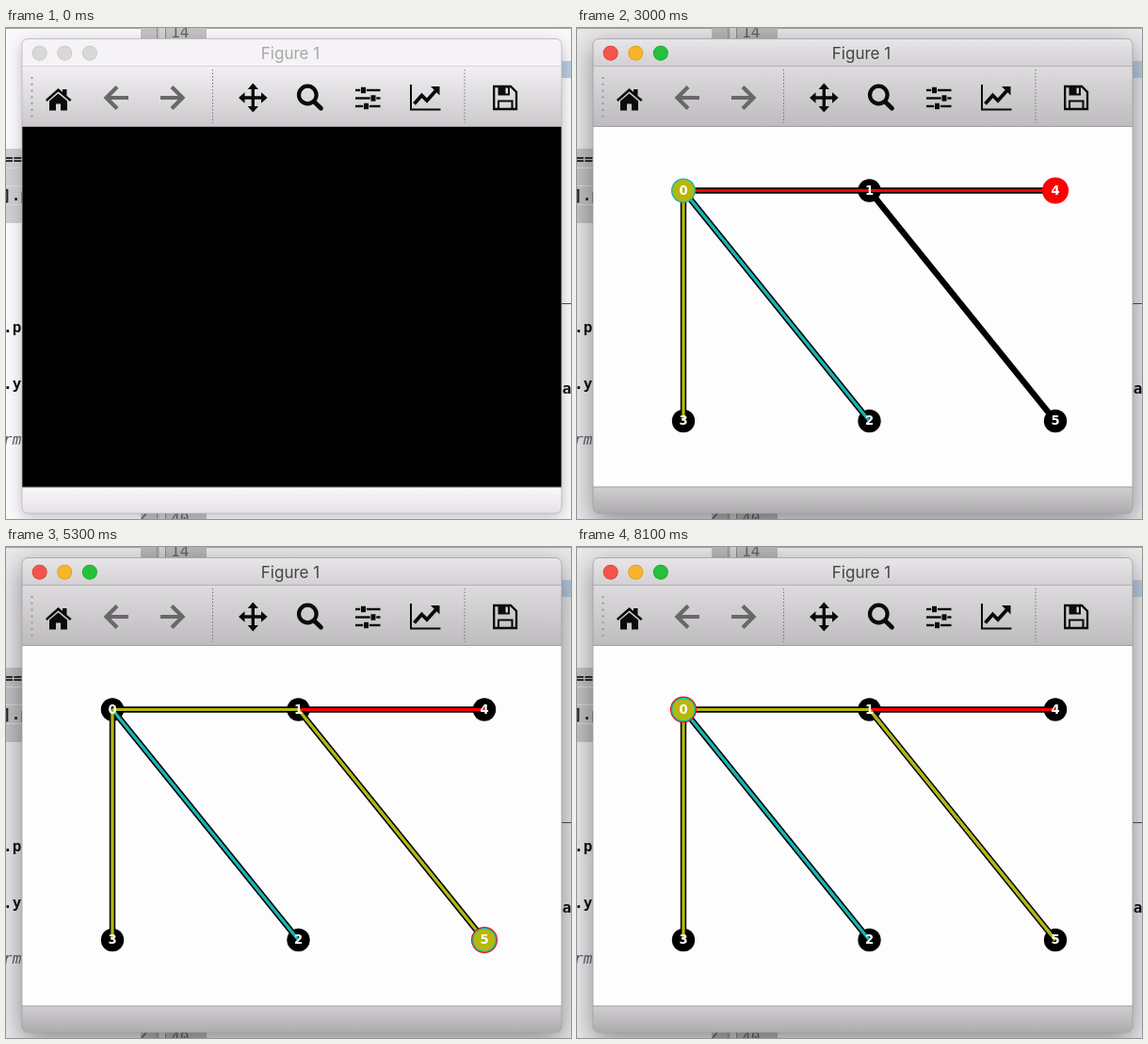
Recreate the animation shown at these times as an HTML page with a canvas. Size 600 by 521 pixels, loop 8.5 s.

```html
<!DOCTYPE html>
<html lang="en">
<head>
<meta charset="utf-8">
<title>Figure 1</title>
<style>
html, body { margin: 0; width: 100%; height: 100%; overflow: hidden; background: #e4e2e4; }
canvas { display: block; width: 600px; height: 521px; }
</style>
</head>
<body>
<canvas id="stage"></canvas>
<script>
const W = 600, H = 521, LOOP = 8500;
const canvas = document.getElementById('stage');
const dpr = window.devicePixelRatio || 1;
canvas.width = W * dpr;
canvas.height = H * dpr;
const ctx = canvas.getContext('2d');
ctx.scale(dpr, dpr);

const MONO = '"DejaVu Sans Mono", monospace';
const RED = '#fe0000', CYAN = '#18b4b4', YELLOW = '#b5b80a';

const nodes = [[113, 172.5], [310.5, 172.5], [310.5, 417], [113, 417], [508, 172.5], [508, 417]];
const edges = [[0, 1], [0, 2], [0, 3], [1, 4], [1, 5]];

// Later walkers sit on top and are slightly smaller.
const walkers = [
  { color: RED, radius: 14, route: [0, 1, 4, 1, 5, 1, 0] },
  { color: CYAN, radius: 13, route: [0, 2, 0, 1, 5, 1, 0] },
  { color: YELLOW, radius: 11.6, route: [0, 3, 0, 1, 5, 1, 0] }
];

function rect(x, y, w, h, fill) {
  ctx.fillStyle = fill;
  ctx.fillRect(x, y, w, h);
}

function disc(x, y, r, fill) {
  ctx.fillStyle = fill;
  ctx.beginPath();
  ctx.arc(x, y, r, 0, Math.PI * 2);
  ctx.fill();
}

function line(x1, y1, x2, y2, color, width, dash = []) {
  ctx.strokeStyle = color;
  ctx.lineWidth = width;
  ctx.setLineDash(dash);
  ctx.beginPath();
  ctx.moveTo(x1, y1);
  ctx.lineTo(x2, y2);
  ctx.stroke();
  ctx.setLineDash([]);
}

function text(str, x, y, font, color, align = 'left') {
  ctx.font = font;
  ctx.fillStyle = color;
  ctx.textAlign = align;
  ctx.fillText(str, x, y);
}

function shade(y1, y2, top, bottom) {
  const g = ctx.createLinearGradient(0, y1, 0, y2);
  g.addColorStop(0, top);
  g.addColorStop(1, bottom);
  return g;
}

function backdrop(active) {
  rect(0, 0, W, H, active ? '#eae8eb' : '#faf8fb');
  rect(0, 0, W, 1, '#aaa8aa');
  rect(0, 128, 20, 79, active ? '#c4c2c4' : '#cfcdcf');
  for (const y of [148, 167, 187]) rect(0, y, 20, 1, '#dddbdd');
  for (const y of [0, 515]) {
    rect(143, y, 70, 12, active ? '#b9b7b9' : '#c3c1c3');
    rect(160, y, 1, 12, '#8c8a8c');
    rect(163, y, 6, 12, '#d3d1d3');
    rect(169, y, 1, 12, '#8c8a8c');
  }
  text('14', 175, 10, '16px ' + MONO, '#646264');
  text('40', 175, 526, '16px ' + MONO, '#646264');
  line(144, 521, 149, 515, '#646264', 1.5);
  const bold = 'bold 16px ' + MONO;
  text('==', -2, 144, bold, '#222');
  text('].p', -4, 183, bold, '#222');
  text('.po', -3, 323, bold, '#111');
  text('.y', -3, 383, bold, '#111');
  text('rma', -3, 442, 'italic 16px ' + MONO, '#59626b');
  rect(589, 35, 11, 18, '#b9cce2');
  rect(589, 292, 11, 1, '#4e4c55');
  text('ma', 581, 388, bold, '#111');
}

function icon(path, color = '#0b0b0b', width = 0) {
  const p = new Path2D(path);
  if (width) {
    ctx.strokeStyle = color;
    ctx.lineWidth = width;
    ctx.stroke(p);
  } else {
    ctx.fillStyle = color;
    ctx.fill(p, 'evenodd');
  }
}

function toolbar() {
  for (let i = 0; i < 7; i++) rect(26.5, 52 + i * 6.8, 2, 2, '#99979a');
  for (const x of [219.5, 487]) line(x, 44, x, 101, '#777577', 1, [1.5, 2]);

  // home
  icon('M42 76 L55.5 64 L60 68 V65 H64.5 V72 L69.5 76 L68 78 L55.5 67.5 L43.5 78 Z');
  icon('M46 77.5 L55.5 69.5 L65 77.5 V87.5 H58 V80.5 H53 V87.5 H46 Z');

  // back and forward
  const gray = '#696769';
  icon('M118 62.5 L106.5 74 L118 85.5 M107 74 H130', gray, 4.2);
  icon('M176 62.5 L187.5 74 L176 85.5 M187 74 H164', gray, 4.2);

  // pan
  icon('M262.3 62 V86 M250 74 H274', '#0b0b0b', 3.4);
  icon('M262.3 58.5 L268 65 H256.6 Z M262.3 89.5 L268 83 H256.6 Z ' +
       'M247 74 L253.5 68.3 V79.7 Z M277.6 74 L271 68.3 V79.7 Z');

  // zoom
  ctx.lineCap = 'round';
  icon('M311 71 a9.3 9.3 0 1 0 18.6 0 a9.3 9.3 0 1 0 -18.6 0', '#0b0b0b', 4.2);
  icon('M327.5 78.5 L334.5 85.2', '#0b0b0b', 4.8);
  ctx.lineCap = 'butt';

  // sliders
  [[66, 377], [74.5, 387.5], [83, 380]].forEach(([y, x]) => {
    rect(371, y - 1.2, 26.5, 2.4, '#0b0b0b');
    rect(x - 0.8, y - 3.5, 6.6, 7, '#d4d2d4');
    rect(x, y - 3.2, 5, 6.4, '#0b0b0b');
  });

  // chart
  icon('M430 60 V86.5 H461.5', '#0b0b0b', 2);
  icon('M433.5 80.5 L441.5 71.5 L447 77 L456.5 66.5', '#0b0b0b', 3.8);
  icon('M451 62 H460.5 V71.5 Z');

  // save
  icon('M518.2 62 H536 L542 68 V86 H518.2 Z', '#0b0b0b', 2.3);
  icon('M523 86 V77.5 H537.5 V86', '#0b0b0b', 2.1);
  icon('M522.5 62 H535 V71.5 H522.5 Z M530.5 63.5 V69.5 H533 V63.5 Z');
}

function frameWindow(active) {
  const box = new Path2D();
  box.roundRect(17, 11.5, 573, 503.5, 6);
  ctx.save();
  ctx.shadowColor = active ? 'rgba(0,0,0,.42)' : 'rgba(0,0,0,.24)';
  ctx.shadowBlur = (active ? 28 : 16) * dpr;
  ctx.shadowOffsetY = (active ? 8 : 4) * dpr;
  ctx.fillStyle = '#d0ced0';
  ctx.fill(box);
  ctx.restore();

  ctx.save();
  ctx.clip(box);
  rect(17, 11, 573, 30, active ? shade(11, 41, '#e8e6e8', '#d2d0d2') : '#f5f3f6');
  rect(17, 40, 573, 1, active ? '#b3b1b3' : '#d5d3d5');
  rect(17, 41, 573, 64, active ? shade(41, 105, '#dddbdd', '#bdbbbd') : shade(41, 105, '#f1eff2', '#cbc9cb'));
  rect(17, 104, 573, 1, '#a09ea0');
  rect(17, 105, 573, 382, active ? '#fefdfe' : '#000');
  rect(17, 487, 573, 28, active ? shade(487, 515, '#d0ced0', '#adabad') : shade(487, 515, '#faf8fb', '#e4e2e5'));
  rect(17, 486.5, 573, 1, active ? '#a09ea0' : '#555355');
  ctx.restore();
  ctx.strokeStyle = active ? '#a3a1a3' : '#b9b7b9';
  ctx.lineWidth = 0.8;
  ctx.stroke(box);

  const lights = [['#f5544d', '#d9443c'], ['#f9b42d', '#dc9b22'], ['#25c13b', '#1ba62d']];
  lights.forEach(([fill, rim], i) => {
    const x = 35.7 + i * 26.6;
    disc(x, 26.7, 8, active ? rim : '#c9c7c9');
    disc(x, 26.7, 7.2, active ? fill : '#d9d7d9');
  });
  text('Figure 1', 302, 33, '17px Inter, sans-serif', active ? '#454345' : '#a9a7a9', 'center');
  toolbar();
}

function graph(step) {
  const link = (a, b, color, width) => line(...nodes[a], ...nodes[b], color, width);
  for (const [a, b] of edges) link(a, b, '#000', 6.4);
  for (const [x, y] of nodes) disc(x, y, 12.2, '#000');
  for (let i = 1; i <= step; i++) {
    for (const { route, color } of walkers) link(route[i - 1], route[i], color, 2.8);
  }
  if (step >= 0) {
    for (const { route, color, radius } of walkers) disc(...nodes[route[step]], radius, color);
  }
  nodes.forEach(([x, y], i) =>
    text(i, x, y + 4.4, 'bold 13.2px "DejaVu Sans", sans-serif', '#fff', 'center'));
}

function draw(now) {
  const t = now % LOOP;
  const active = t >= 100;
  backdrop(active);
  frameWindow(active);
  // One move per second, the walkers appearing after the first.
  if (active) graph(Math.min(6, Math.floor(t / 1000) - 1));
}

const start = performance.now();
function tick() {
  draw(performance.now() - start);
  requestAnimationFrame(tick);
}
tick();
</script>
</body>
</html>
```
